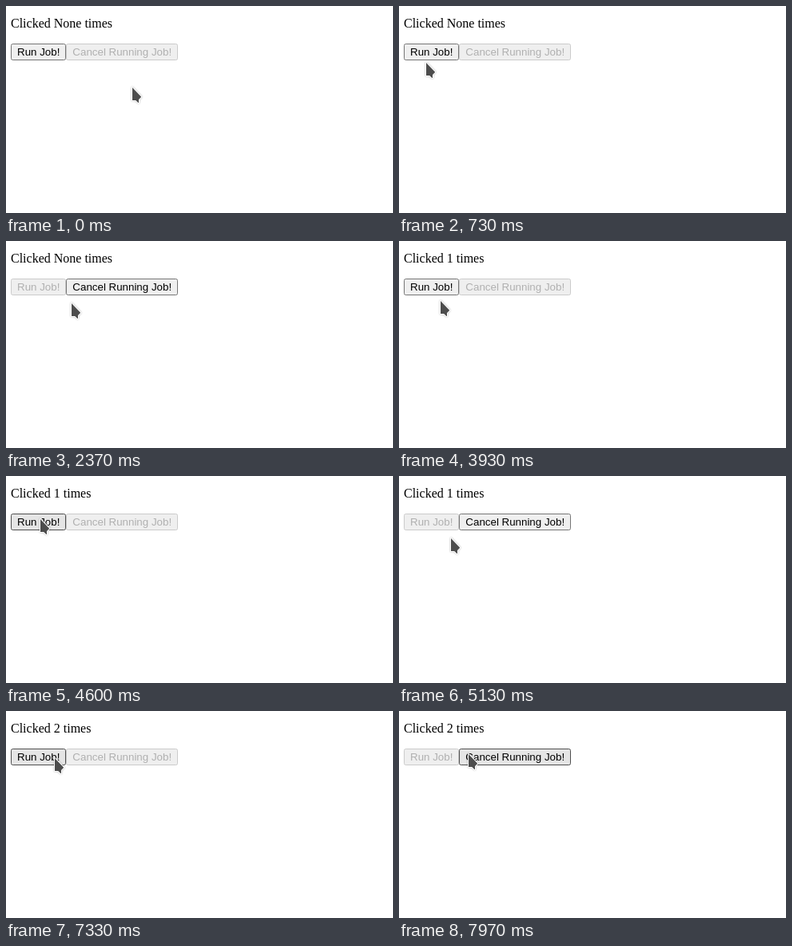
Recreate the animation shown at these times as an HTML page. Size 484 by 259 pixels, loop 8 s.

```html
<!DOCTYPE html>
<html lang="en">
<head>
<meta charset="utf-8">
<title>Job buttons</title>
<style>
  html, body { margin: 0; width: 100%; height: 100%; overflow: hidden; background: #fff; }
  svg { display: block; }
  .label { font: 16px "Liberation Serif", "Times New Roman", serif; }
  .button text { font: 13.3333px "Liberation Sans", Arial, sans-serif; }
  .cursor { filter: drop-shadow(.3px .8px .8px rgba(0, 0, 0, .3)); }
</style>
</head>
<body>
<svg width="484" height="259" viewBox="0 0 484 259">
  <text class="label" id="label" x="6" y="27"></text>
  <g class="button" id="run">
    <rect x="6.5" y="47.5" width="68" height="20" rx="2"/>
    <text x="14" y="62">Run Job!</text>
  </g>
  <g class="button" id="cancel">
    <rect x="75.5" y="47.5" width="139" height="20" rx="2"/>
    <text x="83.36" y="62">Cancel Running Job!</text>
  </g>
  <g class="cursor" id="cursor">
    <path d="M0 0L11 11.5V12L8 15V19H7.4L4.2 16H0Z" fill="#4d4d4d"
      stroke="#fff" stroke-width="2" stroke-linejoin="round" paint-order="stroke"/>
  </g>
</svg>
<script>
const LOOP = 8000;
const STEP = 100 / 3;
const PRESS = 100, START_DELAY = 133;
const $ = id => document.getElementById(id);

// Each pointer move bends towards `via`; without one it is straight
const home = [158, 102];
const moves = [
  { from: 167, until: 533, via: [100, 118], to: [28, 76] },
  { from: 667, until: 900, via: [44, 62], to: [46, 65] },
  { from: 1067, until: 1133, to: [46, 61] },
  { from: 1767, until: 2367, via: [58, 49], to: [82, 78] },
  { from: 3767, until: 4033, via: [53, 86], to: [46, 66] },
  { from: 4267, until: 4400, to: [43, 54] },
  { from: 4767, until: 5133, via: [44, 94], to: [65, 78] },
  { from: 6900, until: 7167, to: [66, 61] },
  { from: 7300, until: 7433, via: [52, 54], to: [51, 57] },
  { from: 7800, until: 7967, to: [87, 54] }
];

const jobs = [{ press: 1330, end: 3530 }, { press: 4500, end: 6700 }, { press: 7670, end: LOOP }];

const looks = {
  normal: ["#efefef", "#767676", "#000"],
  hover: ["#e5e5e5", "#4f4f4f", "#000"],
  active: ["#f5f5f5", "#8d8d8d", "#000"],
  disabled: ["#efefef", "#cbcbcb", "#b0b0b0"]
};

const ease = k => k * k * (3 - 2 * k);

function pointerAt(t) {
  let spot = home;
  for (const { from, until, via, to } of moves) {
    if (t < from) break;
    const k = ease(Math.min(1, (t - from) / (until - from)));
    spot = spot.map((a, i) => {
      const bend = via ? via[i] : (a + to[i]) / 2;
      return (1 - k) ** 2 * a + 2 * k * (1 - k) * bend + k * k * to[i];
    });
  }
  return spot.map(Math.round);
}

function paint(id, look) {
  const [fill, border, ink] = looks[look];
  const rect = $(id).querySelector("rect");
  rect.setAttribute("fill", fill);
  rect.setAttribute("stroke", border);
  $(id).querySelector("text").setAttribute("fill", ink);
}

function draw(time) {
  // Everything advances thirty times a second; times are rounded to 10 ms
  const t = Math.floor((time + 4) / STEP) * STEP + 4;
  const [x, y] = pointerAt(t);
  const over = (left, right) => x >= left && x < right && y >= 47 && y < 68;
  const running = jobs.some(j => t >= j.press + START_DELAY && t < j.end);
  const pressed = jobs.some(j => t >= j.press && t < j.press + PRESS);
  const done = jobs.filter(j => t >= j.end && j.end < LOOP).length;

  $("label").textContent = `Clicked ${done || "None"} times`;
  paint("run", running ? "disabled" : pressed ? "active" : over(6, 75) ? "hover" : "normal");
  paint("cancel", !running ? "disabled" : over(75, 215) ? "hover" : "normal");
  $("cursor").setAttribute("transform", `translate(${x} ${y})`);
}

const begin = performance.now();
function tick() {
  draw((performance.now() - begin) % LOOP);
  requestAnimationFrame(tick);
}
tick();
</script>
</body>
</html>
```
